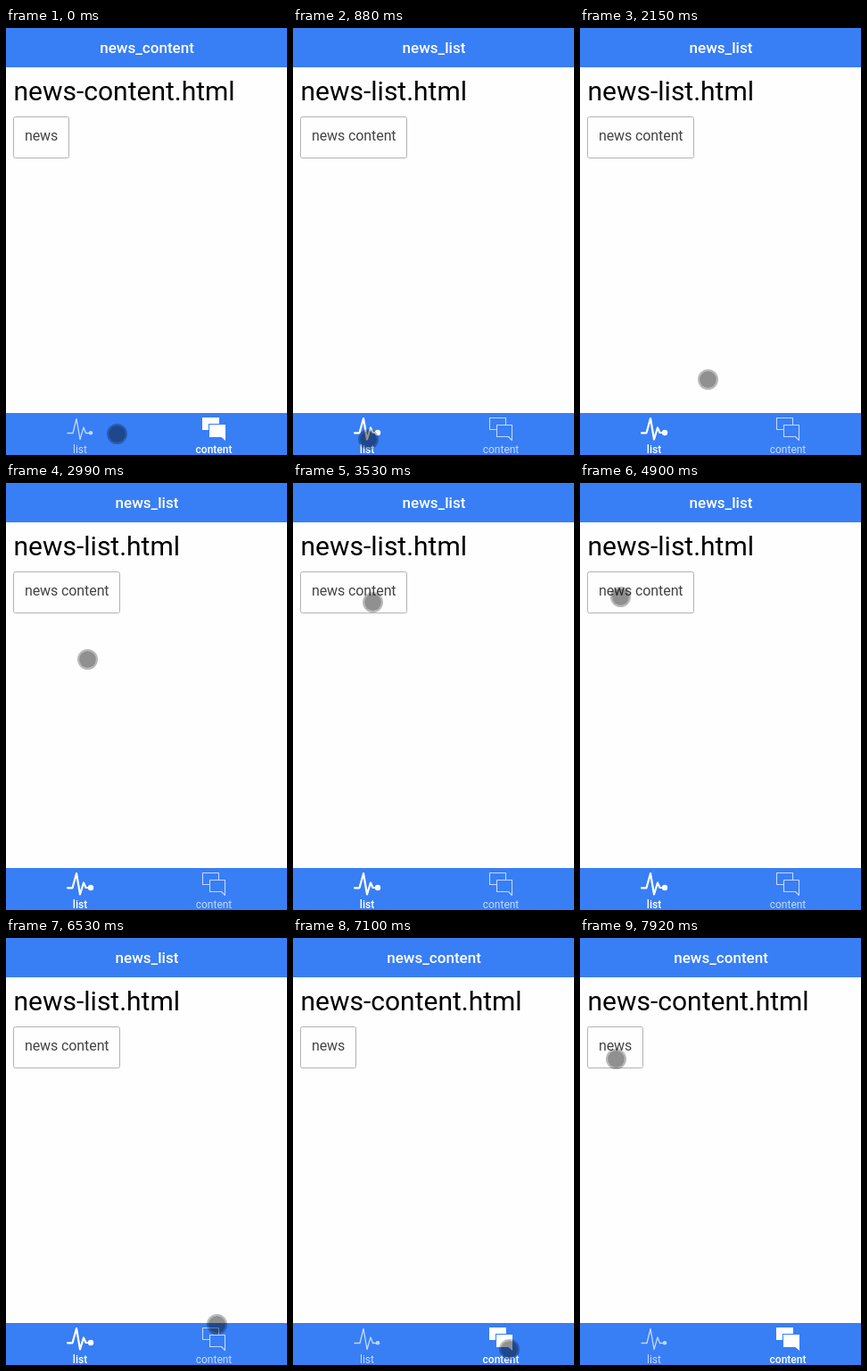
Recreate the animation shown at these times as an HTML page. Size 315 by 478 pixels, loop 8 s.

```html
<!DOCTYPE html>
<html lang="en">
<head>
<meta charset="utf-8">
<title>News tabs</title>
<style>
  html, body { margin: 0; width: 100%; height: 100%; overflow: hidden; background: #fefefe; }
  svg { display: block; width: 100%; height: 100%; font-family: Roboto, sans-serif; }
  .bar { fill: #387ef5; }
  .mid { text-anchor: middle; fill: #fff; }
  .title { font-size: 17px; font-weight: 500; }
  .head { font-size: 30px; }
  .btn { font-size: 16px; letter-spacing: -.1px; fill: #444; }
  .label { font-size: 12px; }
  .tab { opacity: .7; }
  .tab.on { opacity: 1; }
  .on .label { font-weight: 500; }
  .line { fill: none; stroke: #fff; stroke-linejoin: round; stroke-linecap: round; }
  .on .thin, .tab:not(.on) .bold { display: none; }
</style>
</head>
<body>
<svg viewBox="0 0 315 478">
  <rect class="bar" width="315" height="44"/>
  <text id="title" class="mid title" x="158" y="28"></text>
  <text id="head" class="head" x="8.5" y="81"></text>
  <rect id="box" x="8.5" y="99.5" height="46" rx="2" stroke="#b2b2b2"/>
  <text id="btn" class="btn" x="21" y="126"></text>
  <rect class="bar" y="431" width="315" height="47"/>

  <g id="listTab" class="tab">
    <g class="thin">
      <path class="line" stroke-width="1.3" d="M69 453.5H75L79 437.5 83 460.5 87 447 89.5 453.5H94"/>
      <circle cx="95" cy="453.3" r="2.2" fill="#fff"/>
    </g>
    <g class="bold">
      <path class="line" stroke-width="2.2" d="M69 453.3H74.5L79 437 83 460.5 87 447.5 89.5 453H94"/>
      <circle cx="95" cy="453" r="3.2" fill="#fff"/>
    </g>
    <text class="mid label" x="83" y="476">list</text>
  </g>

  <g id="contentTab" class="tab">
    <g class="thin">
      <path class="line" stroke-width="1.1" d="M228 449.5H220.5V436.5H238.5V443.5"/>
      <path class="line" stroke-width="1.1" d="M228.5 444.5H245.5V461.5L241.5 457.5H228.5Z"/>
    </g>
    <g class="bold" fill="#fff">
      <path d="M220 436H239V443H227V450H220Z"/>
      <path d="M228 444H246V462L241.5 458H228Z"/>
    </g>
    <text class="mid label" x="233" y="476">content</text>
  </g>

  <g id="cursor">
    <circle r="10.5" fill="none" stroke="#000" stroke-opacity=".27" stroke-width="2"/>
    <circle r="9.5" fill="#000" fill-opacity=".43"/>
  </g>
</svg>
<script>
const $ = id => document.getElementById(id);
const LOOP = 8000;

const pages = {
  list: { title: 'news_list', head: 'news-list.html', btn: 'news content', width: 119 },
  content: { title: 'news_content', head: 'news-content.html', btn: 'news', width: 62 }
};

// Each tap ends by opening a page; held taps tint the button
const taps = [
  { at: 880, open: 'list' },
  { at: 3800, open: 'content', hold: 150 },
  { at: 4900, open: 'list', hold: 150 },
  { at: 7100, open: 'content' }
];

// The pointer follows a curve towards `to`, pulled by `via`, in even steps
const home = [124, 454];
const moves = [
  { start: 150, end: 300, steps: 2, to: [84, 460] },
  { start: 1850, end: 2870, steps: 8, via: [208, 380], to: [91, 252] },
  { start: 2990, end: 3390, steps: 4, via: [90, 125], to: [89, 133] },
  { start: 4170, end: 4440, steps: 3, to: [45, 127] },
  { start: 6110, end: 6530, steps: 4, via: [150, 150], to: [236, 432] },
  { start: 6680, end: 6680, steps: 1, to: [242, 460] },
  { start: 7380, end: 7920, steps: 5, via: [50, 230], to: [40, 135] }
];

function pointer(t) {
  let from = home;
  for (const { start, end, steps, to, via = to } of moves) {
    if (t < start) break;
    const gap = (end - start) / (steps - 1) || 1;
    const u = Math.min(steps, Math.floor((t - start) / gap + 0.02) + 1) / steps;
    from = from.map((a, i) => (1 - u) ** 2 * a + 2 * u * (1 - u) * via[i] + u * u * to[i]);
  }
  return from;
}

let shown;
function showPage(name) {
  if (name === shown) return;
  shown = name;
  const page = pages[name];
  for (const id of ['title', 'head', 'btn']) $(id).textContent = page[id];
  $('box').setAttribute('width', page.width);
  for (const tab in pages) $(tab + 'Tab').classList.toggle('on', tab === name);
}

function draw(t) {
  const last = taps.filter(tap => tap.at <= t).pop();
  showPage(last ? last.open : 'content');
  const pressed = taps.some(({ at, hold }) => hold && t >= at - hold && t < at);
  $('box').setAttribute('fill', pressed ? '#e5e5e5' : '#fefefe');
  const [x, y] = pointer(t).map(v => Math.round(v) + 0.5);
  $('cursor').setAttribute('transform', `translate(${x} ${y})`);
}

const begin = performance.now();
function tick() {
  draw((performance.now() - begin) % LOOP);
  requestAnimationFrame(tick);
}
tick();
</script>
</body>
</html>
```
